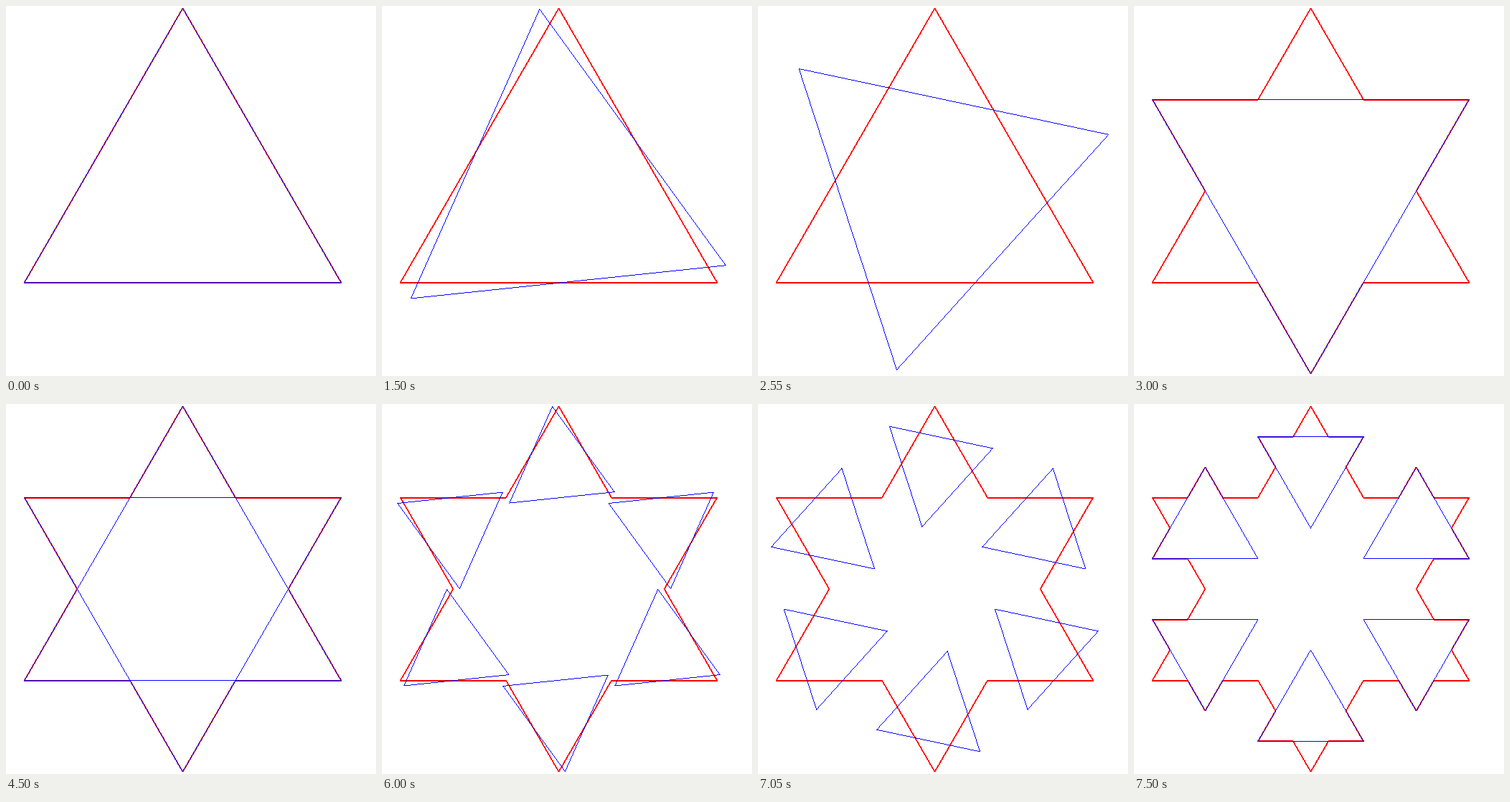
Write an HTML page with a canvas that moves like this. It is 516 px wide and 516 px high and loops after 8000 ms.

```html
<!DOCTYPE html>
<html lang="en">
<head>
<meta charset="utf-8">
<title>Snowflake construction</title>
<style>
  html, body { margin: 0; width: 100%; height: 100%; overflow: hidden; background: #fff; }
  canvas { display: block; width: 100vw; height: 100vh; image-rendering: pixelated; }
</style>
</head>
<body>
<canvas id="stage" width="516" height="516"></canvas>
<script>
const ctx = document.getElementById('stage').getContext('2d');
const SIZE = 516, CX = 246.5, CY = 258.05, R = 254.9;
const LOOP = 8000, STAGE = 4500, HOLD = 1500, STEP = 150, STEPS = 10;
const RAD = Math.PI / 180;

const polar = (x, y, r, deg) => [x + r * Math.cos(deg * RAD), y + r * Math.sin(deg * RAD)];
const triangle = (x, y, r, deg) => [0, 120, 240].map(a => polar(x, y, r, deg + a));

// Replaces the middle third of every edge with an outward bump.
function grow(pts) {
  return pts.flatMap((a, i) => {
    const b = pts[(i + 1) % pts.length];
    const dx = (b[0] - a[0]) / 3, dy = (b[1] - a[1]) / 3;
    const p = [a[0] + dx, a[1] + dy];
    const c = Math.cos(60 * RAD), s = Math.sin(60 * RAD);
    return [a, p, [p[0] + dx * c + dy * s, p[1] - dx * s + dy * c], [a[0] + 2 * dx, a[1] + 2 * dy]];
  });
}

// Hard-edged line, one or two pixels wide.
function line(a, b, width) {
  const steep = Math.abs(b[1] - a[1]) > Math.abs(b[0] - a[0]);
  const m = steep ? 1 : 0, n = 1 - m;
  if (a[m] > b[m]) [a, b] = [b, a];
  const end = Math.floor(b[m]);
  for (let i = Math.floor(a[m]); i <= end; i++) {
    const u = Math.min(1, Math.max(0, (i + 0.5 - a[m]) / (b[m] - a[m])));
    const v = a[n] + (b[n] - a[n]) * u + 1e-6;
    const j = width === 2 ? Math.round(v) - 1 : Math.floor(v);
    if (steep) ctx.fillRect(j, i, width, 1);
    else ctx.fillRect(i, j, 1, width);
  }
}

function outline(pts, color, width) {
  ctx.fillStyle = color;
  pts.forEach((p, i) => line(p, pts[(i + 1) % pts.length], width));
}

const flakes = [triangle(CX, CY, R, -90)];
flakes.push(grow(flakes[0]));
flakes.push(grow(flakes[1]));

function spinners(stage, turn) {
  if (stage === 0) return [triangle(CX, CY, R, -90 - turn)];
  return [0, 60, 120, 180, 240, 300].map(a => {
    const [x, y] = polar(CX, CY, R * 2 / 3, a - 90);
    return triangle(x, y, R / 3, a - 90 - turn);
  });
}

function draw(time) {
  const stage = Math.floor(time / STAGE);
  const t = time - stage * STAGE;
  const step = t < HOLD ? 0 : Math.min(STEPS, Math.floor((t - HOLD) / STEP) + 1);
  const level = stage + (t >= HOLD + STEP * STEPS ? 1 : 0);
  ctx.fillStyle = '#fff';
  ctx.fillRect(0, 0, SIZE, SIZE);
  outline(flakes[level], '#f00', 2);
  spinners(stage, step * 60 / STEPS).forEach(tri => outline(tri, '#00f', 1));
}

const start = performance.now();
function tick() {
  draw((performance.now() - start) % LOOP);
  requestAnimationFrame(tick);
}
tick();
</script>
</body>
</html>
```
